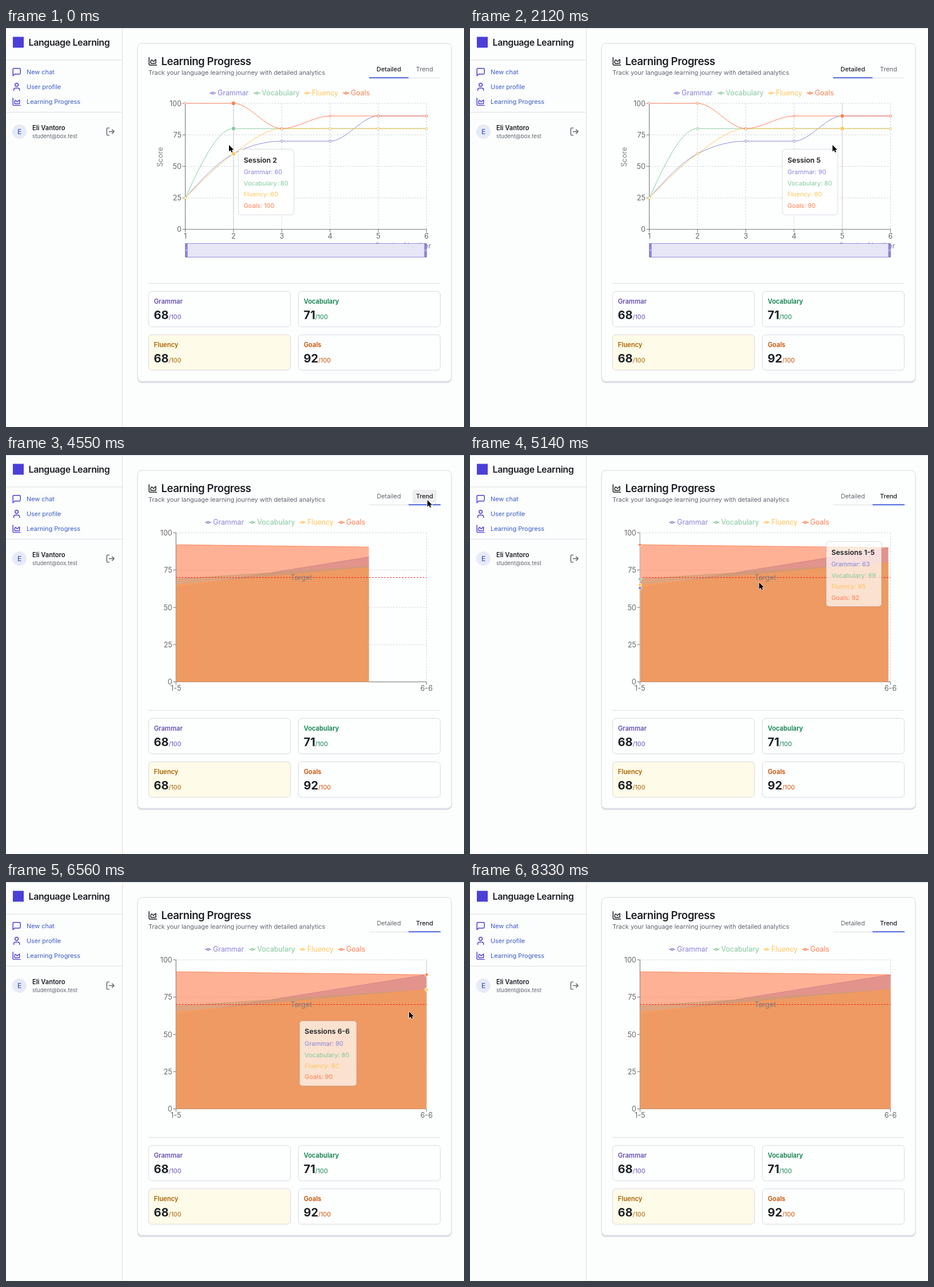
Write an HTML page that moves like this. It is 801 px wide and 699 px high and loops after 8.69 s.

```html
<!DOCTYPE html>
<html lang="en">
<head>
<meta charset="utf-8">
<title>Learning Progress</title>
<style>
html, body { margin: 0; width: 100%; height: 100%; overflow: hidden; background: #fcfdfd; }
svg { display: block; width: 801px; height: 699px; font-family: Inter, "Liberation Sans", sans-serif; }
text { white-space: pre; }
.icon { fill: none; stroke-width: 2; stroke-linecap: round; stroke-linejoin: round; }
.rule { stroke: #dddee4; fill: none; }
.link { font-size: 10.9px; fill: #3a5bc7; }
.small { font-size: 10.9px; }
.tick { font-size: 12.6px; fill: #666; }
.axis { stroke: #666; stroke-width: .9; fill: none; }
.grid { stroke: #ccc; stroke-width: .9; stroke-dasharray: 2.6 2.6; fill: none; }
.hint { font-size: 12.6px; fill: #808080; }
.legend { font-size: 12.4px; }
.mid { text-anchor: middle; }
.end { text-anchor: end; }
.semi { font-weight: 600; }
</style>
</head>
<body>
<svg id="stage" viewBox="0 0 801 699" xmlns="http://www.w3.org/2000/svg"></svg>
<script>
const LOOP = 8690, SWITCH = 3850, REVEAL = 1500, GLIDE = 400;
const series = [
  { name: "Grammar", color: "#8884d8", ink: "#6550b9", score: 68, scores: [25, 60, 70, 70, 90, 90], means: [63, 90] },
  { name: "Vocabulary", color: "#82ca9d", ink: "#0c7f4c", score: 71, scores: [25, 80, 80, 80, 80, 80], means: [69, 80] },
  { name: "Fluency", color: "#ffc658", ink: "#ab6400", score: 68, scores: [25, 60, 80, 80, 80, 80], means: [65, 80] },
  { name: "Goals", color: "#ff7f50", ink: "#cc4e00", score: 92, scores: [100, 100, 80, 90, 90, 90], means: [92, 90] }
];

const detail = {
  left: 313.5, right: 735.5, top: 132, bottom: 352.8, labels: ["1", "2", "3", "4", "5", "6"],
  key: "scores", title: "Session ", legendX: 356, legendY: 113.5, dot: 3.7
};
const trend = {
  left: 297.3, right: 735.5, top: 136.3, bottom: 397.5, labels: ["1-5", "6-6"],
  key: "means", title: "Sessions ", legendX: 348, legendY: 117.5, dot: 2.8
};
for (const c of [detail, trend]) {
  c.x = i => c.left + (c.right - c.left) * i / (c.labels.length - 1);
  c.y = v => c.bottom - (c.bottom - c.top) * v / 100;
}

// Pointer path: time, x, y
const path = [
  [0, 390, 205], [190, 390, 205], [380, 440, 205], [520, 454, 205], [920, 454, 205],
  [1280, 525, 205], [1690, 609, 205], [1750, 634, 205], [2250, 634, 205], [2400, 693, 204],
  [2500, 737, 200], [2530, 738, 195], [2920, 738, 195], [3200, 720, 28], [3310, 719, 30],
  [3480, 737, 79], [4700, 737, 79], [4900, 690, 140], [5130, 516, 222], [5370, 290, 250],
  [5450, 255, 249], [5530, 298, 247], [5610, 310, 247], [5690, 310, 247], [6000, 345, 248],
  [6250, 440, 244], [6370, 516, 238], [6490, 703, 228], [6510, 705, 227], [7640, 705, 227],
  [7850, 715, 400], [7950, 721, 480], [8060, 731, 560], [8200, 752, 640], [8310, 772, 702], [8690, 772, 720]
];

// Tooltip targets: time, point index (-1 hides it), y
const tips = [
  [0, 1, 212], [380, 2, 212], [1280, 3, 212], [1690, 4, 212], [2400, 5, 212], [2500, -1, 0],
  [4900, 1, 150], [5130, 0, 228], [5370, -1, 0], [5530, 0, 253], [6370, 1, 239], [6500, 1, 233],
  [7720, 1, 262], [7850, -1, 0]
];

// CSS "ease" timing curve
function ease(p) {
  if (p <= 0) return 0;
  if (p >= 1) return 1;
  const bez = (a, b, s) => 3 * a * s * (1 - s) ** 2 + 3 * b * s * s * (1 - s) + s ** 3;
  let lo = 0, hi = 1;
  for (let i = 0; i < 24; i++) {
    const m = (lo + hi) / 2;
    if (bez(.25, .25, m) < p) lo = m; else hi = m;
  }
  return bez(.1, 1, lo);
}

const mix = (a, b, p) => a + (b - a) * p;
const chartAt = t => t < SWITCH ? detail : trend;
const line = (x1, y1, x2, y2, attrs) => `<path d="M${x1} ${y1}L${x2} ${y2}" ${attrs}/>`;
const text = (x, y, s, cls, attrs = "") => `<text x="${x}" y="${y}" class="${cls}" ${attrs}>${s}</text>`;
const rect = (x, y, w, h, attrs) => `<rect x="${x}" y="${y}" width="${w}" height="${h}" ${attrs}/>`;
const icon = (x, y, k, color, d) =>
  `<path class="icon" transform="translate(${x} ${y}) scale(${k})" stroke="${color}" d="${d}"/>`;

const shapes = {
  chart: "M3 3v16a2 2 0 0 0 2 2h16M7 11.2a.5.5 0 0 1 .15-.35l2-2a.5.5 0 0 1 .7 0l3.3 3.3a.5.5 0 0 0 .7 0l4.3-4.3a.5.5 0 0 1 .85.35V16a1 1 0 0 1-1 1H8a1 1 0 0 1-1-1z",
  chat: "M21 15a2 2 0 0 1-2 2H7l-4 4V5a2 2 0 0 1 2-2h14a2 2 0 0 1 2 2z",
  user: "M19 21v-2a4 4 0 0 0-4-4H9a4 4 0 0 0-4 4v2M16 7a4 4 0 1 1-8 0a4 4 0 1 1 8 0",
  exit: "M9 21H5a2 2 0 0 1-2-2V5a2 2 0 0 1 2-2h4M16 17l5-5-5-5M21 12H9"
};

// Monotone cubic through evenly spaced points
function curve(pts) {
  const h = pts[1][0] - pts[0][0], n = pts.length;
  const s = pts.slice(1).map((p, i) => (p[1] - pts[i][1]) / h);
  const m = pts.map((_, i) => {
    if (i === 0 || i === n - 1) return 0;
    const a = s[i - 1], b = s[i];
    return (Math.sign(a) + Math.sign(b)) * Math.min(Math.abs(a), Math.abs(b), Math.abs(a + b) / 4);
  });
  m[0] = (3 * s[0] - m[1]) / 2;
  m[n - 1] = (3 * s[n - 2] - m[n - 2]) / 2;
  let d = `M${pts[0]}`;
  for (let i = 1; i < n; i++) {
    const [x0, y0] = pts[i - 1], [x1, y1] = pts[i];
    d += `C${x0 + h / 3} ${y0 + m[i - 1] * h / 3} ${x1 - h / 3} ${y1 - m[i] * h / 3} ${x1} ${y1}`;
  }
  return d;
}

function sidebar() {
  const blue = "#4a3fd8";
  return line(0, .5, 801, .5, 'class="rule"') + line(203.5, 0, 203.5, 699, 'class="rule"')
    + line(0, 56, 203, 56, 'class="rule"') + line(0, 147.5, 203, 147.5, 'class="rule"')
    + rect(12, 15.5, 19, 19, `fill="${blue}"`)
    + text(39.5, 31.3, "Language Learning", "semi", 'font-size="16" letter-spacing="-.025em" fill="#1c2024"')
    + icon(10, 68.5, .72, blue, shapes.chat) + text(36, 81, "New chat", "link")
    + icon(10, 94.5, .72, blue, shapes.user) + text(36, 107, "User profile", "link")
    + icon(10, 120.5, .72, blue, shapes.chart) + text(36, 133, "Learning Progress", "link")
    + '<circle cx="23.5" cy="181.5" r="12.5" fill="#e7eaf7"/>'
    + text(23.5, 186, "E", "mid", 'font-size="12" font-weight="500" fill="#3a5bc7"')
    + text(46, 179, "Eli Vantoro", "semi", 'font-size="11.1" fill="#1c2024"')
    + text(46, 193, "student@box.test", "", 'font-size="9.5" fill="#60646c"')
    + icon(174.2, 173, .71, "#60646c", shapes.exit);
}

function scoreBox(s, i) {
  const x = i % 2 ? 511.5 : 249.5, y = i < 2 ? 461.5 : 537.5;
  const fill = s.name === "Fluency" ? "#fefbe9" : "#fdfefe";
  return rect(x, y, 248, 62, `id="box${i}" rx="5.5" fill="${fill}" stroke="#dadbe2"`)
    + text(x + 9.2, y + 21.6, s.name, "semi", `font-size="11.2" fill="${s.ink}"`)
    + `<text x="${x + 9}" y="${y + 48.6}" font-size="20" font-weight="700" fill="#1c2024">${s.score}`
    + `<tspan font-size="10.9" font-weight="400" fill="${s.ink}">/100</tspan></text>`;
}

function card() {
  return rect(229.5, 29, 550, 593, 'rx="8" fill="#dfe0e7"')
    + rect(230, 27, 549, 592, 'rx="7.5" fill="#fdfefe" stroke="#d9dae1"')
    + icon(248, 49.5, .74, "#1c2024", shapes.chart)
    + text(271.5, 65.3, "Learning Progress", "semi", 'font-size="18.5" letter-spacing="-.02em" fill="#1c2024"')
    + text(249, 82.3, "Track your language learning journey with detailed analytics", "small", 'fill="#60646c"')
    + rect(711, 61, 42, 23, 'id="hover" rx="4" fill="#eeeef1"')
    + text(669.5, 76.3, "Detailed", "small mid", 'id="tab0"') + text(732, 76.3, "Trend", "small mid", 'id="tab1"')
    + line(635, 87.5, 760, 87.5, 'class="rule"') + rect(635, 86.2, 69, 2, 'id="mark" fill="#4a66d8"')
    + line(249, 447.5, 760, 447.5, 'class="rule"') + series.map(scoreBox).join("");
}

function legend(c) {
  const offsets = [0, 77.3, 165, 233];
  return series.map((s, i) => `<g transform="translate(${c.legendX + offsets[i]} ${c.legendY})">`
    + `<path d="M0 .5H3.7M7.3 .5H11M3.7 .5a1.8 1.8 0 1 1 3.6 0a1.8 1.8 0 1 1-3.6 0" fill="none" stroke="${s.color}" stroke-width="1.4"/>`
    + text(14, 4.6, s.name, "legend", `fill="${s.color}"`) + "</g>").join("");
}

function grid(c) {
  return [25, 50, 75, 100].map(v => line(c.left, c.y(v), c.right, c.y(v), 'class="grid"')).join("")
    + c.labels.map((_, i) => line(c.x(i), c.top, c.x(i), c.bottom, 'class="grid"')).join("");
}

function axes(c) {
  const { left, right, top, bottom } = c;
  return `<path class="axis" d="M${left} ${top}V${bottom}H${right}"/>`
    + [0, 25, 50, 75, 100].map(v => line(left - 5, c.y(v), left, c.y(v), 'class="axis"')
      + text(left - 6.5, c.y(v) + 4.6, v, "tick end")).join("")
    + c.labels.map((s, i) => line(c.x(i), bottom, c.x(i), bottom + 5, 'class="axis"')
      + text(c.x(i), bottom + 15.7, s, "tick mid")).join("");
}

function detailChart() {
  const c = detail;
  const curves = series.map(s => {
    const pts = s.scores.map((v, i) => [c.x(i), c.y(v)]);
    return `<g stroke="${s.color}" stroke-width=".95"><path fill="none" d="${curve(pts)}"/>`
      + pts.map(([x, y]) => `<circle cx="${x}" cy="${y}" r="1.9" fill="#fff"/>`).join("") + "</g>";
  }).join("");
  const handle = x => rect(x, 377, 4.4, 24.6, 'fill="#8884d8"')
    + line(x + 1.2, 388.5, x + 3.2, 388.5, 'stroke="#fff" stroke-width=".8"')
    + line(x + 1.2, 390.3, x + 3.2, 390.3, 'stroke="#fff" stroke-width=".8"');
  return grid(c) + axes(c)
    + text(0, 0, "Score", "hint mid", 'transform="translate(274 226) rotate(-90)"')
    + text(743.5, 385.5, "Session Number", "hint end")
    + '<g id="guide0"></g>' + curves
    + rect(313.5, 377.4, 422, 24, 'fill="#e7e6f7" stroke="#8884d8" stroke-width=".9"')
    + handle(313.2) + handle(731.5) + legend(c) + '<g id="dots0"></g>';
}

function trendChart() {
  const c = trend, y70 = c.y(70);
  const areas = series.map(s => {
    const [a, b] = s.means.map(c.y);
    return `<path d="M${c.left} ${a}L${c.right} ${b}V${c.bottom}H${c.left}Z" fill="${s.color}" fill-opacity=".6"/>`
      + line(c.left, a, c.right, b, `stroke="${s.color}" stroke-width=".9"`);
  }).join("");
  return `<clipPath id="clip">${rect(c.left, 100, 0, 298, 'id="wipe"')}</clipPath>`
    + grid(c) + axes(c) + `<g clip-path="url(#clip)">${areas}</g><g id="guide1"></g>`
    + line(c.left, y70, c.right, y70, 'stroke="#f00" stroke-width=".95" stroke-dasharray="2.6 2.6"')
    + text(516.5, y70 + 4.6, "Target", "hint mid") + legend(c) + '<g id="dots1"></g>';
}

const stage = document.getElementById("stage");
stage.innerHTML = sidebar() + card() + `<g id="chart0">${detailChart()}</g><g id="chart1">${trendChart()}</g>`
  + '<g id="tip"></g><path id="pointer" d="M0 0V11.6L2.7 9.1L4.5 13.1L6.4 12.3L4.7 8.4H8.4Z" stroke="#fff" stroke-width="1.4" paint-order="stroke" stroke-linejoin="round"/>';
const el = {};
stage.querySelectorAll("[id]").forEach(n => el[n.id] = n);
const show = (node, on) => node.setAttribute("visibility", on ? "visible" : "hidden");

function pointerAt(t) {
  const i = path.findIndex(p => p[0] > t);
  const a = path[i - 1], b = path[i], p = (t - a[0]) / (b[0] - a[0]);
  return [mix(a[1], b[1], p), mix(a[2], b[2], p)];
}

const glide = (s, t) => s.to.map((v, k) => mix(s.from[k], v, ease((t - s.start) / GLIDE)));

// Each new target starts a fresh glide from wherever the tooltip is.
function tipAt(t) {
  let now = null;
  for (const [start, i, y] of tips) {
    if (start > t) break;
    if (i < 0) { now = null; continue; }
    const c = chartAt(start), w = c === trend && i ? 100 : 97;
    const x = c.x(i), right = x + 8.4;
    const to = [right + w > c.right ? x - 8.2 - w : right, y];
    now = { i, w, start, to, from: now ? glide(now, start) : to };
  }
  return now && { ...now, pos: glide(now, t) };
}

function tipMarkup(c, tip) {
  const [x, y] = tip.pos;
  return `<g transform="translate(${x} ${y})">`
    + rect(.3, .4, tip.w, 115 - (c === trend ? 1 : 0), `rx="5" fill="#fff" fill-opacity="${c === trend ? .7 : .94}" stroke="#00084a" stroke-opacity=".15"`)
    + text(9.4, 23.6, c.title + c.labels[tip.i], "semi", 'font-size="12.4" fill="#1c2024"')
    + series.map((s, k) => text(9.4, 44.3 + 19.4 * k, `${s.name}: ${s[c.key][tip.i]}`, "small", `fill="${s.color}"`)).join("")
    + "</g>";
}

function draw(t) {
  const c = chartAt(t), n = c === detail ? 0 : 1;
  const [px, py] = pointerAt(t), tip = tipAt(t);
  const inside = (x, y, w, h) => px >= x && px <= x + w && py >= y && py <= y + h;

  el.pointer.setAttribute("transform", `translate(${px} ${py})`);
  show(el.chart0, n === 0);
  show(el.chart1, n === 1);
  show(el.hover, inside(711, 61, 42, 23));
  el.mark.setAttribute("x", n ? 704 : 635);
  el.mark.setAttribute("width", n ? 56 : 69);
  [el.tab0, el.tab1].forEach((tab, i) => {
    tab.setAttribute("fill", i === n ? "#1c2024" : "#60646c");
    tab.setAttribute("font-weight", i === n ? 500 : 400);
  });
  el.wipe.setAttribute("width", (trend.right - trend.left + 1) * ease((t - SWITCH) / REVEAL));
  el.box1.setAttribute("fill", inside(511, 461, 249, 63) ? "#f3faf5" : "#fdfefe");
  el.box3.setAttribute("fill", inside(511, 537, 249, 63) ? "#fff8f1" : "#fdfefe");

  const x = tip ? c.x(tip.i) : 0;
  el["guide" + n].innerHTML = tip ? line(x, c.top, x, c.bottom, 'stroke="#ccc" stroke-width=".95"') : "";
  el["dots" + n].innerHTML = tip ? series.map(s =>
    `<circle cx="${x}" cy="${c.y(s[c.key][tip.i])}" r="${c.dot}" fill="${s.color}" stroke="#fff" stroke-width=".9"/>`).join("") : "";
  el.tip.innerHTML = tip ? tipMarkup(c, tip) : "";
}

const begin = performance.now();
function tick() {
  draw((performance.now() - begin) % LOOP);
  requestAnimationFrame(tick);
}
tick();
</script>
</body>
</html>
```
